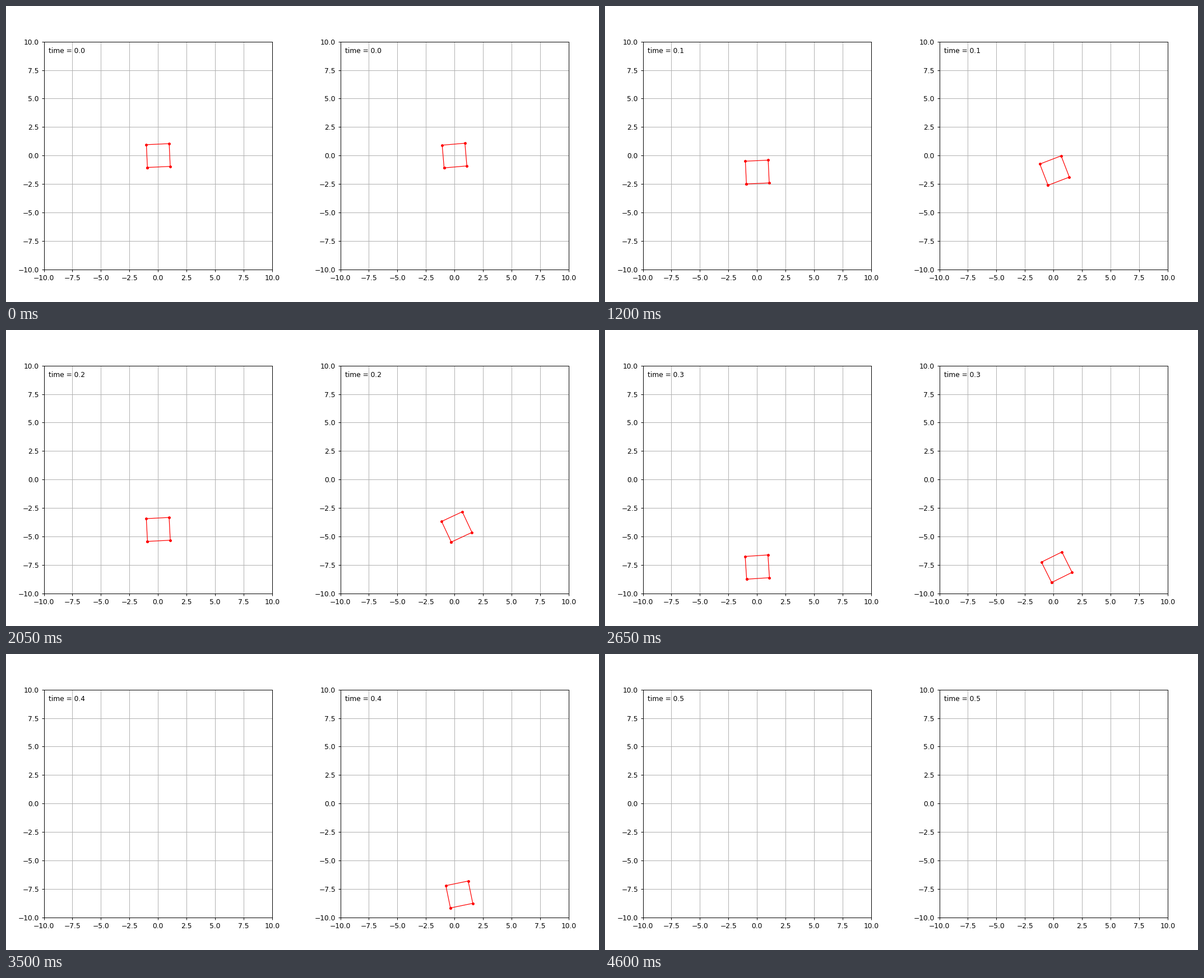
A matplotlib script that plays this animation: 1058x529 px, repeating every 5000 ms.

```python
import numpy as np
import matplotlib.pyplot as plt
from matplotlib.animation import FuncAnimation

WIDTH, HEIGHT = 1058, 529
FRAMES, INTERVAL, TIME_STEP = 100, 50, 0.005
BOUNCE, APEX = 55, 66
CORNERS = np.array([[-1, -1], [1, -1], [1, 1], [-1, 1], [-1, -1]]).T


def fall(step, pull, surge):
    """Height under constant pull, with an extra surge late in the fall."""
    u = step / 53
    return -pull * u**2 - surge * u**5


def free_pose(step):
    """Square that drops straight out of the panel."""
    return 0.025, fall(step, 7, 0.68), 0.045 + 0.02 * (step / 53)**5


def bouncing_pose(step):
    """Square that turns while falling, rebounds once, then drops out."""
    x = 0.42 * (step / 70)**1.4
    if step < BOUNCE:
        return x, fall(step, 6.3, 1.395), 0.085 + 0.405 * (1 - np.exp(-step / 20))
    return x, -7.9 - 0.005 * (step - APEX)**2, 0.473 - 0.018 * (step - BOUNCE)


def square_points(x, y, angle):
    c, s = np.cos(angle), np.sin(angle)
    return np.array([[c, -s], [s, c]]) @ CORNERS + [[x], [y]]


def make_panel(fig, left, pose):
    top, side = 63.6, 0.77 * HEIGHT
    ax = fig.add_axes([left / WIDTH, 1 - (top + side) / HEIGHT,
                       side / WIDTH, side / HEIGHT])
    ticks = np.arange(-10, 10.1, 2.5)
    ax.set(xlim=(-10, 10), ylim=(-10, 10), xticks=ticks, yticks=ticks)
    ax.grid()
    line, = ax.plot([], [], ".-", color="red", lw=1)
    label = ax.text(0.02, 0.95, "", transform=ax.transAxes)
    return line, label, pose


fig = plt.figure(figsize=(12, 6), dpi=WIDTH / 12)
panels = [make_panel(fig, 67.55, free_pose),
          make_panel(fig, 67.55 + WIDTH / 2, bouncing_pose)]


def update(step):
    for line, label, pose in panels:
        line.set_data(*square_points(*pose(step)))
        label.set_text(f"time = {step * TIME_STEP:.1f}")
    return [artist for panel in panels for artist in panel[:2]]


animation = FuncAnimation(fig, update, frames=FRAMES, interval=INTERVAL,
                          repeat=True, repeat_delay=0)
plt.show()
```
